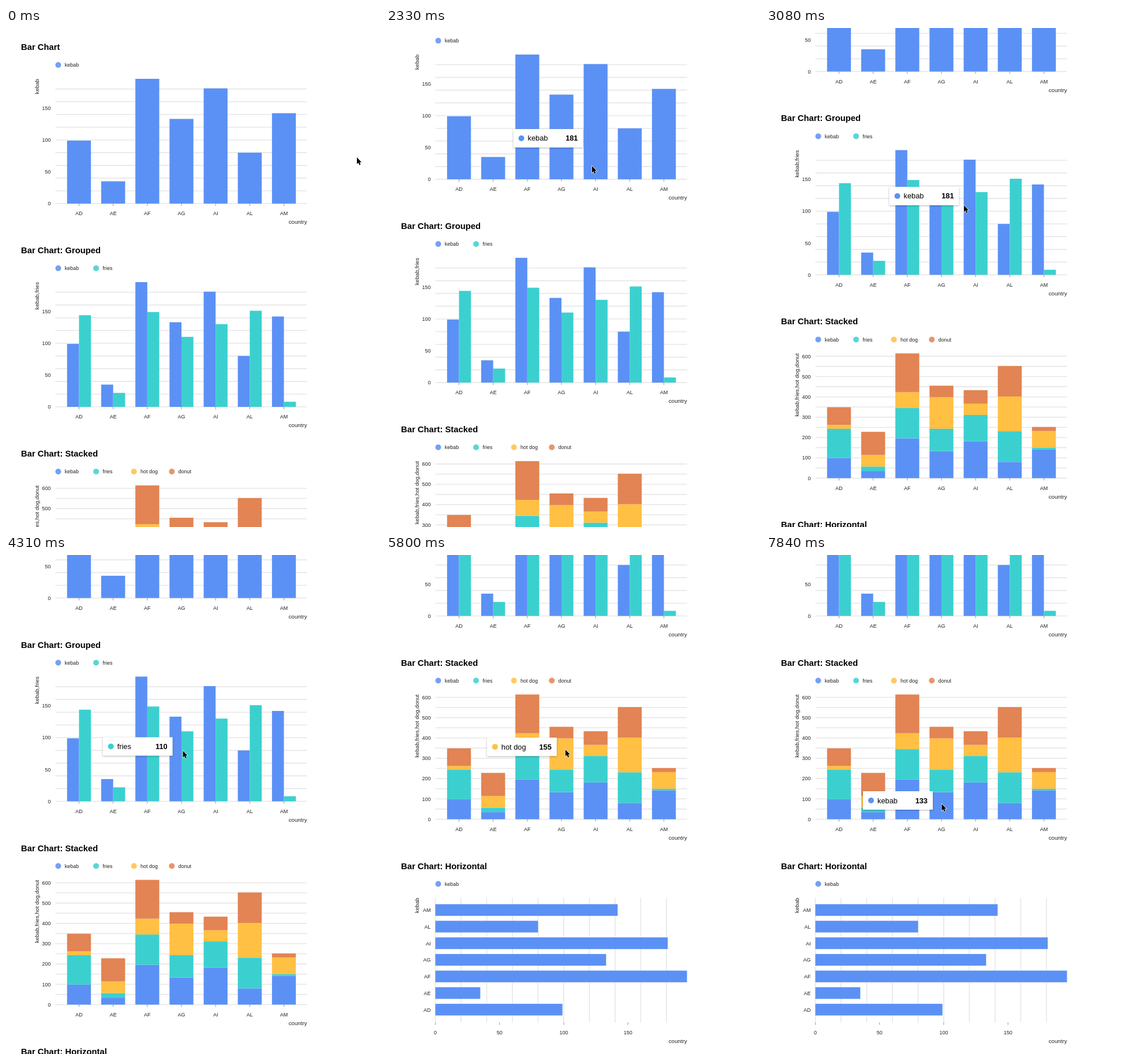
An HTML page for the animation above (8000 ms loop, 648 by 864 pixels).

```html
<!DOCTYPE html>
<html lang="en">
<head>
<meta charset="utf-8">
<title>Bar charts</title>
<style>
  html, body { margin: 0; width: 100%; height: 100%; overflow: hidden; background: #fff; }
  svg { display: block; width: 648px; height: 864px; }
  text { font-family: "Liberation Sans", Arial, sans-serif; font-size: 9px; fill: #222; }
  .title { font-size: 14.8px; font-weight: bold; fill: #000; }
  .axis { font-size: 9.7px; }
  .grid { stroke: #e7e7e8; stroke-width: 1.6; }
  .tick { stroke: #777; stroke-width: .8; }
  .tip text { font-size: 12.8px; fill: #000; }
  .tip rect { fill: #fff; filter: drop-shadow(0 1px 1.5px rgba(0, 0, 0, .3)); }
  .tip .value { font-weight: bold; }
</style>
</head>
<body>
<svg viewBox="0 0 648 864"></svg>
<script>
const countries = ['AD', 'AE', 'AF', 'AG', 'AI', 'AL', 'AM'];
const foods = [
  { name: 'kebab', color: '#5b91f5', values: [99, 35, 196, 133, 181, 80, 142] },
  { name: 'fries', color: '#3bd0cf', values: [144, 22, 149, 110, 130, 151, 8] },
  { name: 'hot dog', color: '#ffc044', values: [19, 57, 78, 155, 55, 171, 82] },
  { name: 'donut', color: '#e28454', values: [87, 114, 191, 57, 67, 150, 20] }
];
const LEFT = 85.5, RIGHT = 521.5, TOP = 88, BASE = 304, BAR = 41.4, PITCH = 59.17;
const STEP = 90, LOOP = 8000;
const bars = [];

function add(parent, tag, attrs = {}, text = '') {
  const node = document.createElementNS('http://www.w3.org/2000/svg', tag);
  for (const key in attrs) node.setAttribute(key, attrs[key]);
  node.textContent = text;
  return parent.appendChild(node);
}
const label = (g, text, x, y, anchor = 'start', cls = '') =>
  add(g, 'text', { x, y, 'text-anchor': anchor, class: cls }, text);
const line = (g, x1, y1, x2, y2, cls) => add(g, 'line', { x1, y1, x2, y2, class: cls });
const rect = (g, x, y, width, height, fill) => add(g, 'rect', { x, y, width, height, fill });

function frame(y, title, series) {
  const g = add(page, 'g', { transform: `translate(0 ${y})` });
  label(g, title, 26, 38, 'start', 'title');
  series.forEach((food, i) => {
    const cx = 90.5 + i * 65.6;
    add(g, 'circle', { cx, cy: 64, r: 5, fill: food.color, 'fill-opacity': .85 });
    label(g, food.name, cx + 11.3, 67.2);
  });
  add(g, 'text', { transform: `translate(57.3 ${TOP}) rotate(-90)`, 'text-anchor': 'end', class: 'axis' },
    series.map(food => food.name).join(','));
  label(g, 'country', RIGHT, 339.3, 'end', 'axis');
  return g;
}

function columns(top, title, count, max, gridStep, labelStep, stacked) {
  const series = foods.slice(0, count), g = frame(top, title, series);
  const scale = (BASE - TOP) / max;
  for (let v = 0; v <= max; v += gridStep) line(g, LEFT, BASE - v * scale, RIGHT, BASE - v * scale, 'grid');
  for (let v = 0; v < max; v += labelStep) label(g, v, 77.5, BASE - v * scale + 3.2, 'end');
  countries.forEach((name, i) => {
    const mid = 126.5 + i * PITCH, w = stacked ? BAR : BAR / count;
    let sum = 0;
    line(g, mid, BASE, mid, BASE + 4, 'tick');
    label(g, name, mid, 324.2, 'middle');
    series.forEach((food, j) => {
      const value = food.values[i], h = value * scale;
      const x = mid - BAR / 2 + (stacked ? 0 : j * w), y = BASE - sum - h;
      rect(g, x, y, w, h, food.color);
      bars.push({ x, y: top + y, w, h, food, value });
      if (stacked) sum += h;
    });
  });
}

function rows(top, title) {
  const g = frame(top, title, foods.slice(0, 1)), scale = (RIGHT - LEFT) / 196;
  for (let v = 0; v < 196; v += 20) line(g, LEFT + v * scale, TOP, LEFT + v * scale, BASE, 'grid');
  for (let v = 0; v < 196; v += 50) {
    const x = LEFT + v * scale;
    line(g, x, BASE, x, BASE + 4, 'tick');
    label(g, v, x, 324.2, 'middle');
  }
  countries.forEach((name, i) => {
    const mid = 281.7 - i * 28.75;
    label(g, name, 77.5, mid + 3.4, 'end');
    rect(g, LEFT, mid - 10.1, foods[0].values[i] * scale, 20.2, foods[0].color);
  });
}

const svg = document.querySelector('svg');
const page = add(svg, 'g');
columns(0, 'Bar Chart', 1, 196, 20, 50);
columns(352, 'Bar Chart: Grouped', 2, 196, 20, 50);
columns(704, 'Bar Chart: Stacked', 4, 614, 50, 100, true);
rows(1056, 'Bar Chart: Horizontal');

const tip = add(page, 'g', { class: 'tip' });
rect(tip, 0, 0, 121, 32, '#fff');
const tipDot = add(tip, 'circle', { cx: 14, cy: 16, r: 5 });
const tipName = label(tip, '', 25, 20.5);
const tipValue = label(tip, '', 112, 20.5, 'end', 'value');

const cursor = add(svg, 'path', {
  d: 'M0 0V11.6L2.6 9.2L4.5 13.4L6.3 12.6L4.6 8.5H8Z',
  stroke: '#fff', 'stroke-width': 1.2, 'paint-order': 'stroke'
});

// Pointer stops: time, x, y
const stops = [
  [90, 608, 224], [1240, 391, 241], [1600, 357, 239], [2600, 357, 239], [2900, 354, 302],
  [3700, 291, 330], [3900, 291, 330], [4230, 305, 338], [4600, 313, 343], [5300, 313, 343],
  [6550, 307, 326], [6640, 307, 316], [7500, 303, 419], [7720, 304.5, 431]
];
const scrolls = [
  { start: 2230, end: 3080, by: 229.5, power: 1.81 },
  { start: 4930, end: 5800, by: 321, power: 4.6 }
];

const progress = (t, start, end) => Math.min(1, Math.max(0, (t - start) / (end - start)));

function pointer(t) {
  let [, x, y] = stops[0];
  for (let i = 1; i < stops.length; i++) {
    const [end, nx, ny] = stops[i], u = progress(t, stops[i - 1][0], end);
    x += (nx - stops[i - 1][1]) * u;
    y += (ny - stops[i - 1][2]) * u;
  }
  return { x, y };
}

const scrollAt = t => scrolls.reduce((sum, s) =>
  sum + s.by * (1 - (1 - progress(t, s.start, s.end)) ** s.power), 0);

// Hovering pauses while the page scrolls fast
function hoverPoint(t) {
  const fast = scrolls.find(s => t > s.start && progress(t, s.start, s.end) < .62);
  const at = fast ? fast.start : t, { x, y } = pointer(at);
  return { x, y: y + scrollAt(at) };
}

function draw(now) {
  const t = Math.floor((now % LOOP + 20) / STEP) * STEP - 20;
  const { x, y } = pointer(t);
  cursor.setAttribute('transform', `translate(${x} ${y})`);
  page.setAttribute('transform', `translate(0 ${-scrollAt(t)})`);

  const p = hoverPoint(t);
  const hit = bars.find(b => p.x >= b.x && p.x < b.x + b.w && p.y >= b.y && p.y < b.y + b.h);
  tip.setAttribute('visibility', hit ? 'visible' : 'hidden');
  if (hit) {
    const trail = hoverPoint(t - STEP);
    tip.setAttribute('transform', `translate(${trail.x - 136.5} ${trail.y - 22})`);
    tipDot.setAttribute('fill', hit.food.color);
    tipName.textContent = hit.food.name;
    tipValue.textContent = hit.value;
  }
  requestAnimationFrame(draw);
}
draw(0);
</script>
</body>
</html>
```
